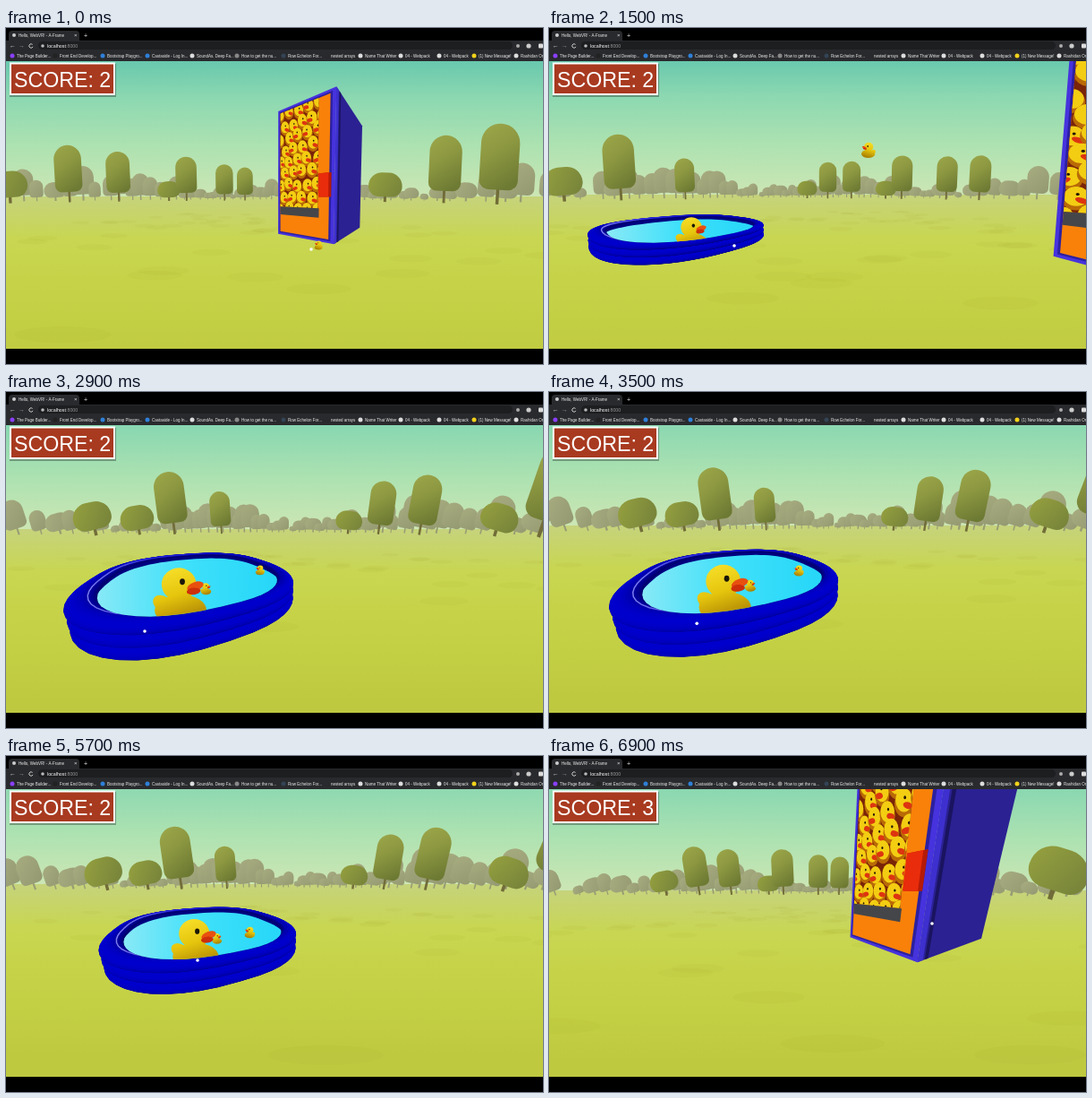
Recreate the animation shown at these times as an HTML page with a canvas. Size 600 by 375 pixels, loop 7000 ms.

```html
<!DOCTYPE html>
<html lang="en">
<head>
<meta charset="utf-8">
<title>Duck pool</title>
<style>
html, body { margin: 0; width: 100%; height: 100%; overflow: hidden; background: #000; }
canvas { display: block; }
</style>
</head>
<body>
<canvas width="600" height="375"></canvas>
<script>
const ctx = document.querySelector('canvas').getContext('2d');
const LOOP = 7000, FOCAL = 190, CX = 300, CY = 197, RAD = Math.PI / 180;
const TOP = 37, BOTTOM = 358;

// Camera walk. World units are eye heights; y points down and the ground lies at 1.
const TIMES = [0, 1500, 2200, 2900, 4300, 5700, 6900];
const YAW = [77, 24, 8, 0, -1.5, -1.5, 56];
const HORIZON = [188, 186, 182, 153, 143, 143, 150];
const CAM_X = [0, -.2, -.1, 0, 0, 0, 1.03];
const CAM_Z = [-2, -2, -1.2, -.05, 0, -.27, -2.5];

// Thrown duck in the world, and the pointer on the screen
const REST = [-.47, .72, 2.4];
const FLYER = [[3.27, .88, -2.1], [1.08, -.52, -.5], [.62, -.46, -.43], [-.27, .72, 3.1], REST, REST, REST];
const POINTER = [[341, 247], [207, 243], [181, 242], [155, 267], [181, 245], [214, 228], [428, 187]];

const POOL = { x: -1.44, z: 3, turn: 58.5 * RAD, halfX: 1.3, halfZ: 1.9 };

// Machine footprint: far front corner, near front corner, back corner
const CORNERS = [[4.42, -1.08], [3.71, -2.42], [5.9, -3.45]];

// Heading and height of the trees that stand out
const TREES = [
  [-46, 1.5], [-38, 1.5], [-30, 3.4], [-17, 2.6], [23, 1.4], [31, 2.9], [40, 2.9], [52, 1.3],
  [57, 3], [69, 2.6], [76, 2.4], [110, 2], [119, 1.6], [130, 3], [137, 3]
];

const noise = n => { const v = Math.sin(n * 127.1) * 43758.5453; return v - Math.floor(v); };
const mix = (a, b, k) => Array.isArray(a) ? a.map((v, i) => mix(v, b[i], k)) : a + (b - a) * k;

function at(keys, t) {
  let i = 0;
  while (t >= TIMES[i + 1] && i < TIMES.length - 2) i++;
  const k = (t - TIMES[i]) / (TIMES[i + 1] - TIMES[i]);
  return mix(keys[i], keys[i + 1], k * k * (3 - 2 * k));
}

let cam;
function aimCamera(t) {
  const horizon = at(HORIZON, t), pitch = Math.atan((CY - horizon) / FOCAL), yaw = at(YAW, t);
  cam = {
    x: at(CAM_X, t), z: at(CAM_Z, t), yaw, horizon,
    sinYaw: Math.sin(yaw * RAD), cosYaw: Math.cos(yaw * RAD),
    sin: Math.sin(pitch), cos: Math.cos(pitch)
  };
}

// Degrees to the right of the line of sight
function bearing(x, z) {
  const a = Math.atan2(x - cam.x, z - cam.z) / RAD - cam.yaw;
  return (a + 540) % 360 - 180;
}

function project(x, y, z) {
  const dx = x - cam.x, dz = z - cam.z;
  const side = dx * cam.cosYaw - dz * cam.sinYaw, ahead = dx * cam.sinYaw + dz * cam.cosYaw;
  const scale = FOCAL / Math.max(.12, ahead * cam.cos + y * cam.sin);
  return [CX + side * scale, CY + (y * cam.cos - ahead * cam.sin) * scale, scale];
}

function gradient(x0, y0, x1, y1, colors) {
  const g = ctx.createLinearGradient(x0, y0, x1, y1);
  colors.forEach((c, i) => g.addColorStop(i / (colors.length - 1), c));
  return g;
}

function oval(x, y, rx, ry, color, turn = 0) {
  ctx.fillStyle = color;
  ctx.beginPath();
  ctx.ellipse(x, y, rx, ry, turn, 0, 7);
  ctx.fill();
}

function rect(x, y, w, h, color, radius = 0) {
  ctx.fillStyle = color;
  ctx.beginPath();
  ctx.roundRect(x, y, w, h, radius);
  ctx.fill();
}

function polygon(points, color) {
  ctx.beginPath();
  points.forEach(([x, y]) => ctx.lineTo(x, y));
  ctx.closePath();
  ctx.fillStyle = color;
  ctx.fill();
}

function label(text, x, y, size, color = '#eee') {
  ctx.font = `${size}px "Liberation Sans", Arial, sans-serif`;
  ctx.fillStyle = color;
  ctx.fillText(text, x, y);
}

function drawLand() {
  const h = cam.horizon;
  rect(0, TOP, 600, h - TOP + 1, gradient(0, h - 165, 0, h, ['#5cc2ac', '#8cd8b1', '#aee2b1', '#cce6b4']));
  rect(0, h, 600, BOTTOM - h, gradient(0, h, 0, h + 190, ['#c6d37c', '#c8d652', '#c6d348', '#c3cf43', '#bec940']));
  for (let i = 0; i < 120; i++) {
    const x = noise(i) * 16 - 7, z = noise(i + 200) * 14 - 6;
    if (Math.abs(bearing(x, z)) > 65) continue;
    const [sx, sy, scale] = project(x, 1, z);
    oval(sx, sy, scale * .35, scale * .06, 'rgba(150,160,30,.07)');
  }
}

function drawTree(heading, distance, height, width, haze) {
  const x = Math.sin(heading * RAD) * distance, z = Math.cos(heading * RAD) * distance;
  if (Math.abs(bearing(x, z)) > 70) return;
  const [bx, by] = project(x, .3, z), [tx, ty] = project(x, .3 - height, z);
  const h = Math.hypot(tx - bx, ty - by), w = h * width, round = width > .8;
  const colors = haze ? ['#a8ac80', '#959a72'] : height > 2 ? ['#9da84a', '#8b9640', '#6d7a33'] : ['#96a13f', '#76833a'];
  ctx.save();
  ctx.translate(bx, by);
  ctx.rotate(Math.atan2(tx - bx, by - ty));
  rect(-w * .04, -h * .4, w * .08, h * .4, haze ? '#989c74' : '#716c38');
  const crown = round ? [w * .4, w * .4, w * .3, w * .3] : [w * .5, w * .5, w * .25, w * .25];
  rect(-w / 2, -h, w, h * .82, gradient(-w / 2, -h, w / 2, -h * .3, colors), crown);
  ctx.restore();
}

function drawTrees() {
  for (let i = 0; i < 120; i++) {
    const height = .9 + 1.3 * noise(i + 31) + .6 * Math.sin(i / 4);
    drawTree(i * 2.2 - 85 + noise(i), 17, height, height < 1.3 ? 1.2 : .65, true);
  }
  for (const [heading, height] of TREES)
    drawTree(heading, 12, height, height < 1.8 ? 1.15 : .48, false);
}

function drawMachine() {
  if (Math.abs(bearing(...CORNERS[0])) > 62) return;
  const spot = (face, u, v) => {
    const [x, z] = mix(CORNERS[face], CORNERS[face + 1], u);
    return project(x, 3.2 * v - 2.2, z);
  };
  const quad = (face, u0, v0, u1, v1, color) =>
    polygon([[u0, v0], [u1, v0], [u1, v1], [u0, v1]].map(([u, v]) => spot(face, u, v)), color);

  quad(1, 0, 0, 1, 1, '#2b2192');
  quad(1, 0, 0, .06, 1, '#3d30cf');
  quad(1, .08, 0, .12, 1, '#1a1460');
  quad(0, 0, 0, 1, 1, '#4633dd');
  quad(0, .03, .015, .95, .985, '#2c20a0');
  quad(0, .05, .025, .92, .975, '#f98109');
  ctx.save();
  quad(0, .05, .025, .75, .77, '#7a2408');
  ctx.clip();
  for (let i = 0; i < 45; i++) {
    const row = Math.floor(i / 5);
    const u = .04 + (i % 5 + (row % 2) / 2) * .17 + noise(i) * .04, v = .03 + row * .092 + noise(i + 9) * .03;
    const [x, y] = spot(0, u, v);
    const rx = Math.abs(spot(0, u + .09, v)[0] - x), ry = spot(0, u, v + .05)[1] - y;
    const side = noise(i + 40) > .45 ? 1 : -1;
    oval(x, y + ry * .3, rx, ry, '#b96a06');
    oval(x, y, rx * .9, ry * .9, '#f3cd12');
    oval(x + side * rx * .4, y + ry * .4, rx * .5, ry * .26, '#dd3510', .3 * side);
    oval(x + side * rx * .1, y - ry * .2, rx * .13, ry * .13, '#221505');
  }
  ctx.restore();
  quad(0, .05, .77, .77, .835, '#45464a');
  quad(0, .76, .53, .95, .69, '#b51a08');
  quad(0, .76, .53, .91, .69, '#e92c0c');
}

function drawDuck(x, y, z, radius, facing) {
  const [sx, sy, scale] = project(x, y, z);
  const plumage = gradient(-.6, -1, .4, 2.2, ['#f7e02a', '#e6c50d', '#ab8203']);
  ctx.save();
  ctx.translate(sx, sy);
  ctx.scale(scale * radius * facing, scale * radius);
  oval(.1, 1.5, 1.5, .9, plumage);
  oval(-.9, 1.15, .65, .45, plumage, .6);
  oval(0, 0, 1, .95, plumage);
  oval(.95, .12, .5, .25, '#e8500f', -.35);
  oval(.85, .4, .4, .2, '#cc2f0a', -.1);
  oval(.2, -.15, .15, .18, '#1b1708');
  ctx.restore();
}

// Outline of the pool at one level, clockwise on the screen
function ring(y, grow) {
  const points = [], round = v => Math.sign(v) * Math.abs(v) ** .8;
  const s = Math.sin(POOL.turn), c = Math.cos(POOL.turn);
  for (let i = 0; i < 60; i++) {
    const a = -i * 6 * RAD;
    const u = round(Math.cos(a)) * (POOL.halfX + grow), w = round(Math.sin(a)) * (POOL.halfZ + grow);
    points.push(project(POOL.x + u * s - w * c, y, POOL.z + u * c + w * s));
  }
  return points;
}

function drawPool(t) {
  if (Math.abs(bearing(POOL.x, POOL.z)) > 75) return;

  // Three stacked tubes, built from thin slices; the top one rolls over to the inside
  for (let tube = 0; tube < 3; tube++) {
    for (let a = -90; a <= (tube === 2 ? 180 : 90); a += 10) {
      const light = .5 + .5 * Math.cos((a - 40) * RAD);
      polygon(ring(.95 - tube * .11 - .06 * Math.sin(a * RAD), .11 * Math.cos(a * RAD)),
        `rgb(0,0,${Math.round(85 + 120 * light)})`);
    }
  }
  const rim = ring(.68, -.05), xs = rim.map(p => p[0]), ys = rim.map(p => p[1]);
  const left = Math.min(...xs), right = Math.max(...xs), middle = (Math.min(...ys) + Math.max(...ys)) / 2;
  ctx.beginPath();
  rim.forEach(([x, y]) => ctx.lineTo(x, y));
  ctx.closePath();
  ctx.lineWidth = 1.5;
  ctx.strokeStyle = gradient(left, 0, right, 0, ['#7d7df0', '#2a2ade', '#0c0cc4', '#0000b0']);
  ctx.stroke();

  const inner = ring(.73, -.11);
  ctx.save();
  polygon(inner, '#000080');
  ctx.clip();
  polygon(ring(.82, -.04), gradient(left, 0, right, 0, ['#8feaf6', '#3fe0fa', '#25d6f8']));
  ctx.restore();

  // Ducks stay behind the front rim but may rise above the back one
  ctx.save();
  ctx.beginPath();
  inner.forEach(([x, y]) => ctx.lineTo(x, y));
  ctx.closePath();
  ctx.rect(left, TOP, right - left, middle - TOP);
  ctx.clip();
  if (t >= 2900) drawDuck(...at(FLYER, t), .055, -1);
  if (t >= 2600) drawDuck(-.89, .72, 2.04, .045, 1);
  drawDuck(-1.05, .59, 1.73, .19, 1);
  ctx.restore();
}

const BOOKMARKS = [
  [12, 'The Page Builder...', '#8a3ffc'], [60, 'Front End Develop...', '#222'],
  [113, 'Bootstrap Playgro...', '#2f80d8'], [163, 'Castaside - Log In...', '#2f80d8'],
  [213, 'SoundAs. Deep Fa...', '#ddd'], [263, 'How to get the nu...', '#888'],
  [315, 'Row Echelon For...', '#345'], [363, 'nested arrays', '#292a2d'],
  [401, 'Name That Writer', '#ddd'], [446, '04 - Webpack', '#ddd'], [489, '04 - Webpack', '#ddd'],
  [528, '(1) New Message!', '#f2d21b'], [575, 'Rashidan Omb', '#ddd']
];

function drawBrowser() {
  rect(0, 0, 600, TOP, '#000');
  rect(0, 14, 600, 23, '#292a2d');
  rect(3, 3, 79, 12, '#292a2d', [4, 4, 0, 0]);
  oval(9, 8, 2, 2, '#ccc');
  label('Hello, WebVR! - A-Frame', 14, 10, 4.5);
  label('×', 76, 10, 6);
  label('+', 87, 11, 7);
  label('←', 4, 22, 7);
  label('→', 14, 22, 7, '#999');
  ctx.strokeStyle = '#ddd';
  ctx.lineWidth = .9;
  ctx.beginPath();
  ctx.arc(28, 20, 2.2, .4, 5.6);
  ctx.stroke();
  rect(36, 15, 530, 9, '#1d1e20', 4.5);
  oval(41, 20, 1.8, 1.8, '#bbb');
  label('localhost', 46, 21.8, 5.3, '#fff');
  label(':8000', 67, 21.8, 5.3, '#999');
  oval(572, 20, 2, 2, '#aaa');
  oval(584, 20, 2.6, 2.6, '#ccc');
  rect(595, 17.5, 5, 5, '#ddd', 1);
  for (const [x, text, color] of BOOKMARKS) {
    oval(x - 5, 31, 2.5, 2.5, color);
    label(text, x, 32.7, 4.5);
  }
}

function drawScore(t) {
  rect(4, 40, 119, 37, 'rgba(0,0,0,.3)');
  rect(4, 38.5, 118, 36.5, '#fff');
  rect(6, 40.5, 114, 32.5, '#a83a20');
  label('SCORE: ' + (t < 6200 ? 2 : 3), 9, 66, 23.2, '#fff');
}

function draw() {
  const t = Math.floor(performance.now() % LOOP / 100) * 100;
  aimCamera(t);
  rect(0, 0, 600, 375, '#000');
  ctx.save();
  ctx.beginPath();
  ctx.rect(0, TOP, 600, BOTTOM - TOP);
  ctx.clip();
  drawLand();
  drawTrees();
  drawMachine();
  drawPool(t);
  if (t < 2900) drawDuck(...at(FLYER, t), .05, -1);
  oval(...at(POINTER, t), 1.8, 1.8, '#fff');
  ctx.restore();
  drawBrowser();
  drawScore(t);
  requestAnimationFrame(draw);
}
draw();
</script>
</body>
</html>
```
